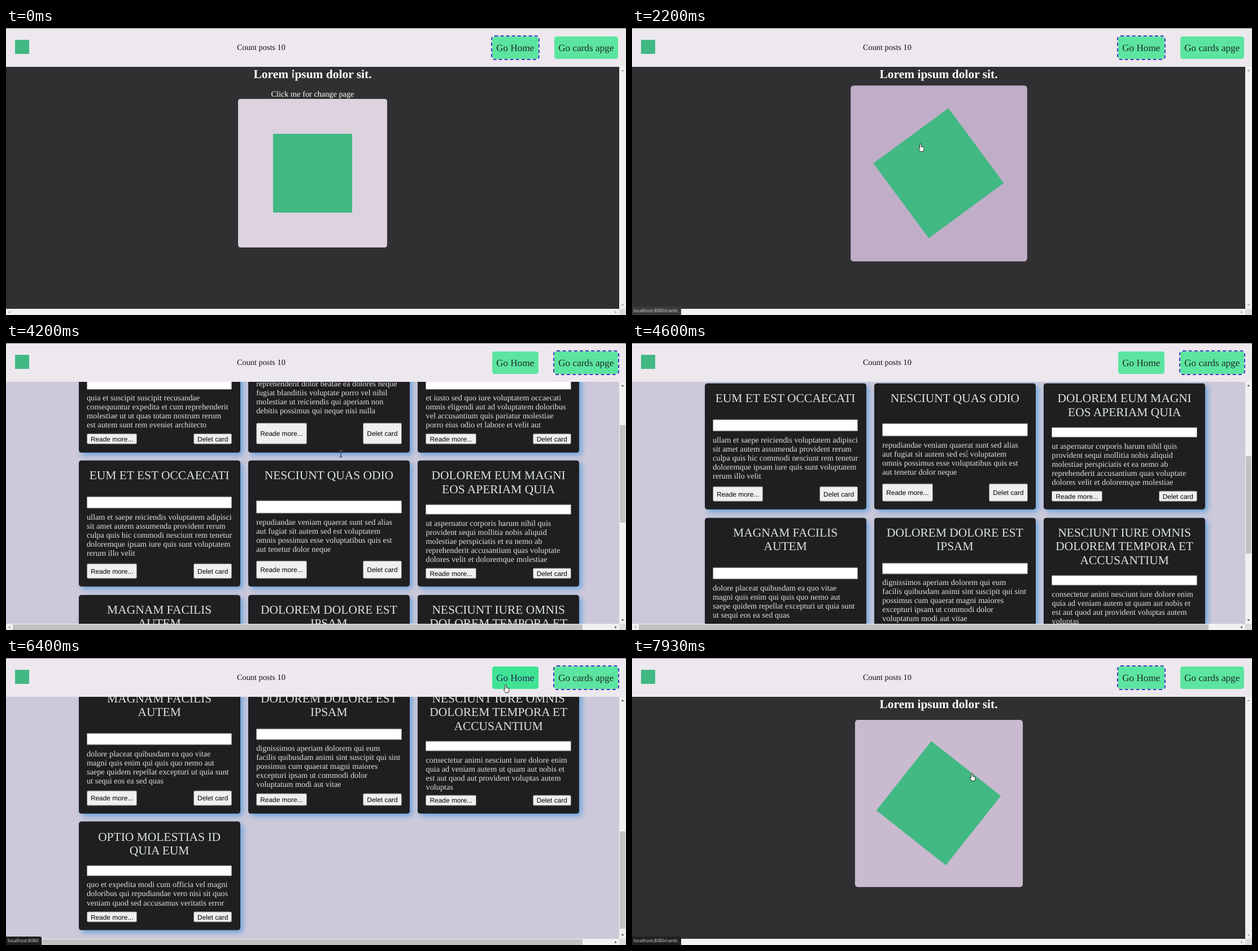
An HTML page that plays this animation: 1098 by 510 pixels, repeating every 8000 ms.

```html
<!DOCTYPE html>
<html lang="en">
<head>
<meta charset="utf-8">
<style>
html, body { margin: 0; width: 100%; height: 100%; overflow: hidden; }
body { position: relative; background: #f1f1f1; text-rendering: geometricPrecision;
  font: 14.3px/16.1px "Liberation Serif", "Times New Roman", serif; }
body * { box-sizing: border-box; }
div, span, svg { position: absolute; white-space: pre; }
header { position: absolute; width: 1098px; height: 69px; background: #ede8ee; border-top: 1px solid #77747b; color: #111; }
.mark { background: #42b883; }
.nav { top: 14px; height: 40px; border-radius: 4.5px; background: #5ce5a0; color: #1e2b27;
  font-size: 17.17px; line-height: 41px; text-align: center; }
.focus { outline: 2px dashed #413bc4; }
.hover { background: #40e294; color: #26265c; }
.view { top: 69px; width: 1086px; height: 430px; overflow: hidden; }
#home { background: #303032; color: #fff; text-align: center; }
#home > span { width: 100%; left: 0; }
#home b { font-size: 21.46px; }
#tile { left: 410.7px; top: 56.7px; width: 264.6px; height: 264.6px; border-radius: 4.5px; }
#tile .mark { left: 62.3px; top: 62.3px; width: 140px; height: 140px; }
#cards { background: #cdc9da; }
#list { width: 100%; top: -69px; }
.card { width: 286px; border-radius: 4.5px; background: #1f1f21; color: #dbe4dd;
  box-shadow: 4.5px 4.5px 10px #6ba3dc; }
.card > * { left: 14.3px; }
.title { top: 14.3px; width: 257.4px; text-align: center; font-size: 21.46px; line-height: 24.5px; }
.field { width: 257.4px; background: #fff; border: 1px solid #858585; border-radius: 1px; }
.btn { bottom: 14.3px; padding: 0 6px; border: 1px solid #767676; border-radius: 2.5px; background: #efefef; color: #000;
  font: 11.92px "Liberation Sans", Arial, sans-serif; display: flex; align-items: center; }
.btn + .btn { left: auto; right: 14.3px; }
#status { left: 0; top: 494.5px; height: 15.5px; padding-left: 3px; border-radius: 0 3px 0 0; color: #dedede;
  font: 8.1px/16px "Open Sans", "Noto Sans", sans-serif; }
svg { left: 0; top: 0; }
#beam { mix-blend-mode: difference; }
</style>
</head>
<body>
<header>
  <div class="mark" style="left:16px;top:20px;width:25px;height:25px"></div>
  <span style="left:409px;top:25.5px">Count posts 10</span>
  <div class="nav" id="goHome" style="left:861px;width:81.5px">Go Home</div>
  <div class="nav" id="goCards" style="left:971px;width:112.5px">Go cards apge</div>
</header>
<div class="view" id="home">
  <span style="top:4.6px"><b>Lorem ipsum dolor sit.</b></span>
  <span style="top:40.5px">Click me for change page</span>
  <div id="tile"><div class="mark" id="spin"></div></div>
</div>
<div class="view" id="cards"><div id="list"></div></div>
<svg width="1098" height="510">
  <rect x="1086" y="499" width="12" height="11" fill="#dcdcdc"/>
  <g id="thumbs" fill="#c1c1c1">
    <rect id="thumb" x="1087" y="81" width="10" height="173"/>
    <rect x="12" y="500" width="1009" height="10"/>
  </g>
  <path id="up" d="M1089.5 77h5l-2.5-3z"/>
  <path id="down" d="M1089.5 491h5l-2.5 3z"/>
  <path d="M7 502.5v5l-3-2.5z" fill="#a3a3a3"/>
  <path id="right" d="M1078.5 502.5v5l3-2.5z"/>
</svg>
<div id="status"></div>
<svg id="beam" width="1098" height="510"><path d="M-2-5.5h1.5l.5.5.5-.5h1.5M0-5V5M-2 5.5h1.5l.5-.5.5.5h1.5" fill="none" stroke="#aaa"/></svg>
<svg id="pointer" width="1098" height="510"><path fill="#fff" stroke="#111" stroke-width=".9" stroke-linejoin="round"/></svg>
<script>
const $ = id => document.getElementById(id);
const LOOP = 8000, SHOW_CARDS = 3000, SHOW_HOME = 6870;
const ARROW = 'M0 0V12L2.8 9.5 4.8 13.8 6.7 13 4.8 8.8H8.6Z';
const HAND = 'M-1.4 8V1a1.3 1.3 0 0 1 2.6 0v4l3.8 .9q1.3.4 1.2 1.9l-.6 3.2-1 2.6h-4.8l-3.3-4.8q-.5-1.6.9-1.3z';

// Each row: height, then cards of [title, text, field top, field height, button height]
const rows = [
  [257.5,
    ['SUNT AUT FACERE|REPELLAT PROVIDENT|OCCAECATI EXCEPTURI|OPTIO REPREHENDERIT', 'quia et suscipit suscipit recusandae|consequuntur expedita et cum reprehenderit|molestiae ut ut quas totam nostrum rerum|est autem sunt rem eveniet architecto', 127, 18.5, 19],
    ['QUI EST ESSE', 'est rerum tempore vitae sequi sint nihil|reprehenderit dolor beatae ea dolores neque|fugiat blanditiis voluptate porro vel nihil|molestiae ut reiciendis qui aperiam non|debitis possimus qui neque nisi nulla', 79, 25, 38],
    ['EA MOLESTIAS QUASI|EXERCITATIONEM|REPELLAT QUI IPSA SIT|AUT', 'et iusto sed quo iure voluptatem occaecati|omnis eligendi aut ad voluptatem doloribus|vel accusantium quis pariatur molestiae|porro eius odio et labore et velit aut', 127, 18.5, 19]],
  [224.5,
    ['EUM ET EST OCCAECATI', 'ullam et saepe reiciendis voluptatem adipisci|sit amet autem assumenda provident rerum|culpa quis hic commodi nesciunt rem tenetur|doloremque ipsam iure quis sunt voluptatem|rerum illo velit', 64, 21.5, 27],
    ['NESCIUNT QUAS ODIO', 'repudiandae veniam quaerat sunt sed alias|aut fugiat sit autem sed est voluptatem|omnis possimus esse voluptatibus quis est|aut tenetur dolor neque', 71, 23.5, 32.5],
    ['DOLOREM EUM MAGNI|EOS APERIAM QUIA', 'ut aspernatur corporis harum nihil quis|provident sequi mollitia nobis aliquid|molestiae perspiciatis et ea nemo ab|reprehenderit accusantium quas voluptate|dolores velit et doloremque molestiae', 78, 18.5, 19]],
  [231.5,
    ['MAGNAM FACILIS|AUTEM', 'dolore placeat quibusdam ea quo vitae|magni quis enim qui quis quo nemo aut|saepe quidem repellat excepturi ut quia sunt|ut sequi eos ea sed quas', 88, 21.5, 27],
    ['DOLOREM DOLORE EST|IPSAM', 'dignissimos aperiam dolorem qui eum|facilis quibusdam animi sint suscipit qui sint|possimus cum quaerat magni maiores|excepturi ipsam ut commodi dolor|voluptatum modi aut vitae', 80.5, 19.5, 21.5],
    ['NESCIUNT IURE OMNIS|DOLOREM TEMPORA ET|ACCUSANTIUM', 'consectetur animi nesciunt iure dolore enim|quia ad veniam autem ut quam aut nobis et|est aut quod aut provident voluptas autem|voluptas', 102, 18.5, 19]],
  [193,
    ['OPTIO MOLESTIAS ID|QUIA EUM', 'quo et expedita modi cum officia vel magni|doloribus qui repudiandae vero nisi sit quos|veniam quod sed accusamus veritatis error', 78, 18.5, 19]]
];

const lines = s => s.replaceAll('|', '\n');
let rowTop = 98, html = '';
for (const [height, ...cards] of rows) {
  cards.forEach(([title, text, top, fieldH, btnH], col) => {
    html += `<div class="card" style="left:${128.6 + 300.3 * col}px;top:${rowTop}px;height:${height}px">
<div class="title">${lines(title)}</div><div class="field" style="top:${top}px;height:${fieldH}px"></div>
<div style="top:${top + fieldH + 7.5}px">${lines(text)}</div>
<div class="btn" style="height:${btnH}px">Reade more...</div><div class="btn" style="height:${btnH}px">Delet card</div></div>`;
  });
  rowTop += height + 14.3;
}
$('list').innerHTML = html;

const clamp = x => Math.min(1, Math.max(0, x));
const smooth = x => (x = clamp(x), x * x * (3 - 2 * x));

// CSS "ease" curve, cubic-bezier(.25, .1, .25, 1)
function ease(x) {
  if (x <= 0 || x >= 1) return clamp(x);
  const bez = (a, b, s) => 3 * (1 - s) ** 2 * s * a + 3 * (1 - s) * s * s * b + s ** 3;
  let lo = 0, hi = 1;
  for (let i = 0; i < 20; i++) {
    const mid = (lo + hi) / 2;
    if (bez(.25, .25, mid) < x) lo = mid; else hi = mid;
  }
  return bez(.1, 1, lo);
}

// Pointer stops: time, x, y
const path = [
  [0, 509, 83], [340, 509, 83], [780, 447, 6], [1200, 498, 36], [1580, 508, 127], [2070, 511, 206],
  [2200, 511, 206], [2600, 570, 217], [2790, 570, 217], [2800, 573, 219], [2990, 573, 219], [3000, 593, 197],
  [5270, 593, 197], [5600, 690, 150], [5900, 845, 75], [6130, 885, 48],
  [7410, 885, 48], [7580, 672, 160], [7750, 618, 198], [7930, 602, 205], [LOOP, 602, 205]
];
function pointerAt(t) {
  const i = Math.max(1, path.findIndex(p => p[0] > t));
  const [t0, x0, y0] = path[i - 1], [t1, x1, y1] = path[i];
  const k = (t - t0) / (t1 - t0);
  return [x0 + (x1 - x0) * k, y0 + (y1 - y0) * k];
}

function statusAt(t) {
  if (t >= 1640 && t < 2800) return ['/cards', '#3b3b3c', 1];
  if (t >= 2800 && t < 3530) return ['/cards', '#202021', 1 - clamp((t - 3270) / 260)];
  if (t >= 6330) return [t < 7600 ? '' : '/cards', '#202021', t < 6400 ? .5 : 1];
  return ['', '#202021', 0];
}

function draw(t) {
  const onCards = t >= SHOW_CARDS && t < SHOW_HOME;
  $('home').style.display = onCards ? 'none' : '';
  $('cards').style.display = $('thumbs').style.display = onCards ? '' : 'none';

  const p = ease((t - (t > 5000 ? 7580 : 1580)) / 1000);
  const mix = (a, b) => a + (b - a) * p;
  $('tile').style.transform = `scale(${1 + .2 * p})`;
  $('tile').style.background = `rgb(${mix(220, 189)},${mix(211, 170)},${mix(223, 197)})`;
  $('spin').style.transform = `rotate(${360 * p}deg)`;

  const scroll = 285 * smooth((t - 4040) / 296) + 278.5 * smooth((t - 4560) / 310);
  $('list').style.transform = `translateY(${-scroll}px)`;
  $('thumb').setAttribute('y', 81 + scroll * .403);
  const shade = on => on ? '#505050' : '#a3a3a3';
  $('up').style.fill = shade(onCards && scroll > 0);
  $('down').style.fill = $('right').style.fill = shade(onCards);

  const [x, y] = pointerAt(t);
  const overNav = x > 861 && x < 942 && y < 55;
  $('goHome').className = 'nav' + (onCards ? '' : ' focus') + (overNav ? ' hover' : '');
  $('goCards').className = 'nav' + (onCards ? ' focus' : '');

  const beam = t < 400 || (onCards && t < 5330);
  const hand = overNav || (!onCards && p > 0);
  $('beam').style.display = beam ? '' : 'none';
  $('pointer').style.display = beam ? 'none' : '';
  const shape = $('pointer').firstChild;
  shape.setAttribute('d', hand ? HAND : ARROW);
  for (const el of [shape, $('beam').firstChild]) el.setAttribute('transform', `translate(${x} ${y})`);

  const [page, color, alpha] = statusAt(t), status = $('status');
  status.textContent = 'localhost:8080' + page;
  status.style.width = page ? '87px' : '63px';
  status.style.background = color;
  status.style.opacity = alpha;
}

function frame() {
  draw(performance.now() % LOOP);
  requestAnimationFrame(frame);
}
frame();
</script>
</body>
</html>
```
